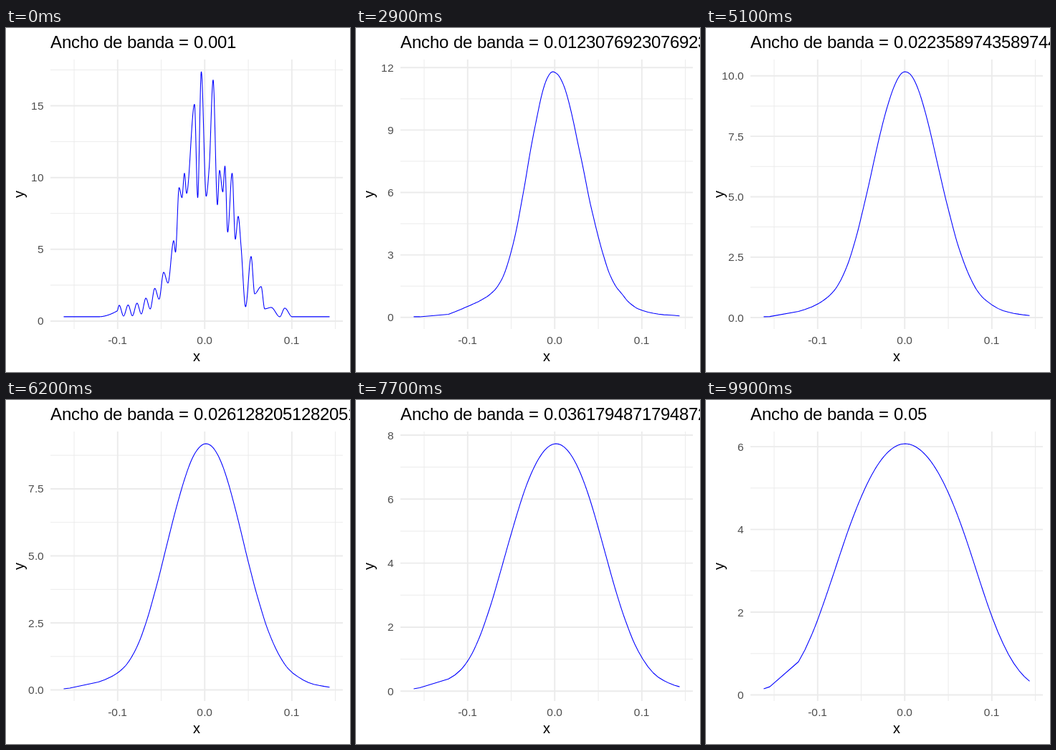
Write an HTML page with a canvas that moves like this. It is 480 px wide and 480 px high and loops after 10000 ms.

```html
<!DOCTYPE html>
<html lang="es">
<head>
<meta charset="utf-8">
<title>Ancho de banda</title>
<style>
  html, body { margin: 0; width: 100%; height: 100%; overflow: hidden; background: #fff; }
  canvas { display: block; width: 100vw; height: 100vh; }
</style>
</head>
<body>
<canvas id="stage" width="480" height="480"></canvas>
<script>
const ctx = document.getElementById('stage').getContext('2d');
const FONT = '"Liberation Sans", Arial, sans-serif';
const PANEL = { left: 62, right: 470, top: 44, bottom: 420 };
const HEIGHT = PANEL.bottom - PANEL.top;
const X0 = 277.3, X_UNIT = 1215, X_MIN = 80.5, X_MAX = 451.5;
const FRAME = 100, FRAMES = 100, STATES = 40, OBSERVATIONS = 1117;

// Peak density at a few states
const PEAKS = [[0, 17.37], [1, 14.6], [4, 12.92], [10, 11.8], [17, 10.17], [21, 9.18], [28, 7.73], [39, 6.07]];

// Main peaks and valleys of the narrowest estimate: stage x, density
const RIDGE = [
  [234, 5.6], [236.5, 4.8], [241.5, 9.3], [245.5, 8.6], [249, 10.3], [252, 8.9],
  [263, 15.1], [267.5, 8.6], [272.5, 17.37], [279.3, 8.7], [283.5, 10.7], [289, 16.8],
  [295, 8.1], [298, 10.5], [302.5, 9], [305.5, 10.8], [309.3, 6.2], [315.5, 10.3],
  [320, 5.7], [324, 7.3], [328, 5.2], [334.3, 1], [342, 4.5], [347, 1.9],
  [356, 2.4], [361, .85], [370, .95], [382, .3], [389, .9], [399.3, .3], [X_MAX, .3]
];

function range(from, to, step) {
  const out = [];
  for (let v = from; v <= to + 1e-9; v += step) out.push(v);
  return out;
}

const bandwidth = k => .001 + k * .049 / (STATES - 1);

// The left flank ripples evenly while it climbs
const ripples = range(0, 5, 1).flatMap(i => {
  const x = 158 + 12.4 * i, climb = 2.3 * (i / 5) ** 3;
  return [[x, 1.1 + climb], [x + 6, .35 + climb]];
});

// Monotone cubic through points
function monotone(pts) {
  const sec = pts.slice(1).map(([x, y], i) => (y - pts[i][1]) / (x - pts[i][0]));
  const slope = pts.map((_, i) => {
    const a = sec[i - 1], b = sec[i];
    return a * b > 0 ? 2 * a * b / (a + b) : 0;
  });
  return x => {
    let i = 0;
    while (i < sec.length - 1 && x > pts[i + 1][0]) i++;
    const w = pts[i + 1][0] - pts[i][0], t = (x - pts[i][0]) / w, u = 1 - t;
    return u * u * (1 + 2 * t) * pts[i][1] + t * t * (3 - 2 * t) * pts[i + 1][1]
      + w * t * u * (u * slope[i] - t * slope[i + 1]);
  };
}

const rough = monotone([[X_MIN, .3], [129, .3], [155, .7], ...ripples, ...RIDGE]);
const peakAt = monotone(PEAKS);

// Lone observations in the tails, a continuous density between them
const leftTail = [X_MIN, 89, 129, 138];
const rightTail = range(400, X_MAX + .1, (X_MAX - 400) / 7);
const SAMPLE = .5;
const atoms = [
  ...[...leftTail, ...rightTail].map(x => [x, 1]),
  ...range(146, 394, SAMPLE).map(x => [x, rough(x) * OBSERVATIONS / X_UNIT * SAMPLE])
];
const grid = [...leftTail, ...range(146, 394, 1), ...rightTail];

// Epanechnikov estimate; the samples already carry the first bandwidth
function estimate(k) {
  const reach = Math.sqrt(5 * (bandwidth(k) ** 2 - 1e-6)) * X_UNIT;
  return grid.map(x => {
    let sum = 0;
    for (const [ax, w] of atoms) sum += w * Math.max(0, 1 - ((x - ax) / reach) ** 2);
    return [x, sum];
  });
}

// The curve always fills the panel less its 5 % margins
function makeCurve(k) {
  const pts = k ? estimate(k) : range(X_MIN, X_MAX, .25).map(x => [x, rough(x)]);
  const vals = pts.map(p => p[1]);
  const lo = Math.min(...vals), hi = Math.max(...vals), pad = HEIGHT / 22;
  return pts.map(([x, v]) => [x, PANEL.bottom - pad - (v - lo) / (hi - lo) * (HEIGHT - 2 * pad)]);
}
const curves = range(0, STATES - 1, 1).map(makeCurve);

// Density at the ends: one observation, plus the bulk once it comes within reach
const lowAt = k => .0003 / bandwidth(k) + .144 * (bandwidth(k) / .05) ** 2.4;

// Extended Wilkinson labelling, weighing simplicity, coverage and density
function breakStep(min, max) {
  const wanted = 4;
  let best = -Infinity, choice;
  [1, 5, 2, 2.5, 4, 3].forEach((step, rank) => {
    for (let n = 1; n < 9; n++) {
      const last = n * step;
      const cover = 1 - .5 * ((max - last) ** 2 + min ** 2) / (.1 * (max - min)) ** 2;
      const ratio = (Math.max(last, max) - min) / step / wanted;
      const score = .25 * (1 - rank / 5) + .2 * cover + .5 * (2 - Math.max(ratio, 1 / ratio));
      if (score > best) [best, choice] = [score, step];
    }
  });
  return choice;
}

// Whole-pixel advances, as in hinted text
function text(str, x, y, size, color, align = 0) {
  ctx.font = `${size}px ${FONT}`;
  ctx.fillStyle = color;
  const widths = [...str].map(c => Math.round(ctx.measureText(c).width));
  x -= align * widths.reduce((a, b) => a + b, 0);
  [...str].forEach((c, i) => {
    ctx.fillText(c, x, y);
    x += widths[i];
  });
}

function line(pts, color, width) {
  ctx.strokeStyle = color;
  ctx.lineWidth = width;
  ctx.beginPath();
  pts.forEach(([x, y]) => ctx.lineTo(x, y));
  ctx.stroke();
}

const hLine = (y, w) => line([[PANEL.left, y], [PANEL.right, y]], '#ebebeb', w);
const vLine = (x, w) => line([[x, PANEL.top], [x, PANEL.bottom]], '#ebebeb', w);

function draw(k, titleState) {
  ctx.fillStyle = '#fff';
  ctx.fillRect(0, 0, 480, 480);

  const low = lowAt(k), high = peakAt(k), pad = (high - low) * .05;
  const min = low - pad, max = high + pad;
  const toY = v => PANEL.bottom - (v - min) / (max - min) * HEIGHT;
  const toX = v => X0 + v * X_UNIT;
  const step = breakStep(min, max);
  const xBreaks = [-.1, 0, .1], yBreaks = range(0, max, step);

  range(step / 2, max, step).forEach(v => hLine(toY(v), .97));
  range(-.15, .15, .1).forEach(v => vLine(toX(v), .97));
  yBreaks.forEach(v => hLine(toY(v), 1.94));
  xBreaks.forEach(v => vLine(toX(v), 1.94));

  ctx.lineJoin = 'round';
  line(curves[k], '#0000ff', 1.07);

  const digits = Number.isInteger(step) ? 0 : 1;
  yBreaks.forEach(v => text(v.toFixed(digits), 53, Math.round(toY(v) + 5.5), 15.5, '#4d4d4d', 1));
  xBreaks.forEach(v => text(v.toFixed(1), toX(v), 441, 15.5, '#4d4d4d', .5));
  text('x', 266, 465, 20, '#000', .5);
  ctx.save();
  ctx.translate(25, 232);
  ctx.rotate(-Math.PI / 2);
  text('y', 0, 0, 20, '#000', .5);
  ctx.restore();
  const value = Number(bandwidth(titleState).toPrecision(15));
  text('Ancho de banda = ' + value, 62, 28, 24, '#000');
}

// Three steps per state at first, two later; the title lags the curve
function statesAt(n) {
  if (n < 62) return [Math.floor((n + 1) / 3), Math.min(20, Math.floor(n / 3))];
  return [21 + Math.floor((n - 62) / 2), 20 + Math.floor((n - 61) / 2)];
}

let shown = -1;
const start = performance.now();
function tick() {
  const n = Math.floor((performance.now() - start) / FRAME) % FRAMES;
  if (n !== shown) {
    shown = n;
    draw(...statesAt(n));
  }
  requestAnimationFrame(tick);
}
tick();
</script>
</body>
</html>
```
